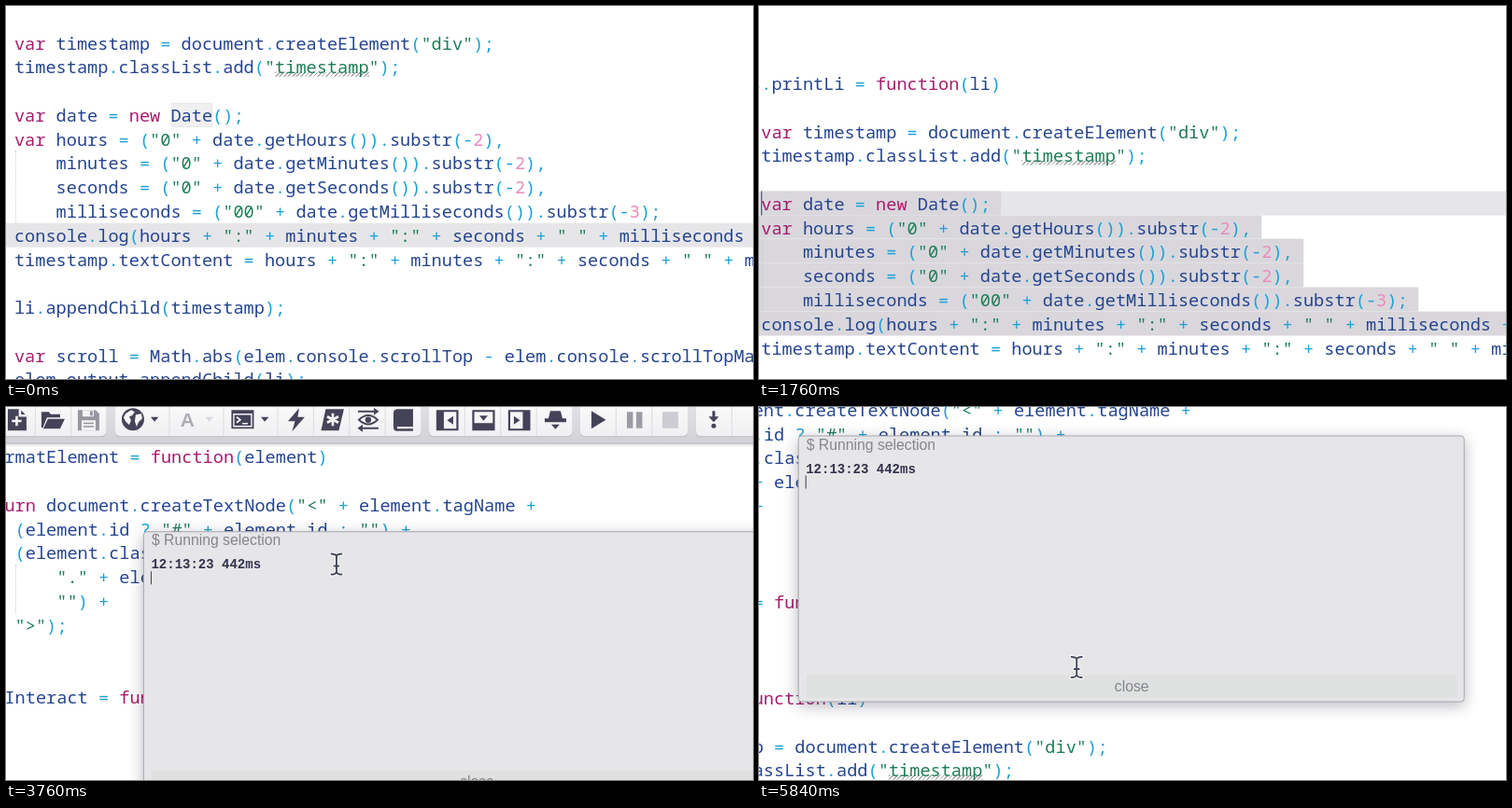
Animation, 800 px wide and 400 px high, one loop 6240 ms. Source, as an HTML page:

```html
<!DOCTYPE html>
<html lang="en">
<head>
<meta charset="utf-8">
<title>Running a selection</title>
<style>
html, body { margin: 0; width: 100%; height: 100%; overflow: hidden; background: #fff; }
#stage { position: relative; width: 800px; height: 400px; overflow: hidden; background: #fff; }
#cam { position: absolute; left: 0; top: 0; width: 0; height: 0; }
#cam > * , #popup > * , .row, .bar, .guide { position: absolute; }
.row { font: 18.62px/25.77px "Noto Sans Mono", "DejaVu Sans Mono", monospace; white-space: pre; color: #25458f; }
.k { color: #a81c6b; }
.s { color: #1f7d57; }
.n { color: #ea8cbd; }
.o { color: #1ba0d6; }
.bar { height: 25.77px; }
.sel { background: #d9d7dc; }
#active { left: -300px; width: 1500px; background: #e6e6e8; }
#word { background: #f0f0f1; box-shadow: inset 0 0 0 1px #e6e7ea; }
#caret { width: 1.4px; background: #33344a; }
.guide { width: 0; border-left: 1px dotted #c9cbd2; }
#wave { height: 5px; background: repeating-linear-gradient(-45deg, #a9aaae 0 1.2px, transparent 1.2px 3.2px); }
#bar { left: -60px; top: 0; }
#popup { left: 160px; top: 146px; width: 712px; height: 284px; background: #e6e6e8; border: 1px solid #a7a7b0;
  border-radius: 4px; box-shadow: 0 4px 16px rgba(40, 40, 60, .32); font: 15.75px/20px "Liberation Sans", Arial, sans-serif; color: #85858e; }
#head { left: 8px; top: -1px; white-space: pre; }
#out { left: 7.5px; top: 25px; font: bold 14px/20px "Liberation Mono", "Courier New", monospace; color: #33324c; }
#prompt { left: 7px; top: 42px; width: 1.4px; height: 14px; background: #3c3c52; }
#close { left: 8px; top: 256px; width: 697px; height: 24px; line-height: 23px; text-align: center; background: #dfe0e0; }
#mouse { left: 0; top: 0; width: 1px; height: 1px; overflow: visible; }
</style>
</head>
<body>
<div id="stage"><div id="cam">
  <div id="active" class="bar"></div>
  <div id="word" class="bar"></div>
  <div id="code"></div>
  <div id="caret" class="bar"></div>

  <svg id="bar" width="1100" height="58" viewBox="-60 0 1100 58">
    <defs>
      <linearGradient id="metal" x2="0" y2="1"><stop stop-color="#e6e5e9"/><stop offset="1" stop-color="#d2d1d6"/></linearGradient>
      <linearGradient id="key" x2="0" y2="1"><stop stop-color="#fafafb"/><stop offset="1" stop-color="#f0f0f2"/></linearGradient>
      <linearGradient id="fade" x2="0" y2="1"><stop stop-color="#000" stop-opacity=".14"/><stop offset="1" stop-opacity="0"/></linearGradient>
    </defs>
    <path d="M-60 0H1040V52H-60z" fill="url(#metal)"/>
    <path d="M-60 51.5H1040" stroke="#bdbcc2"/>
    <path d="M-60 52H1040V56H-60z" fill="url(#fade)"/>
    <g id="keys" fill="url(#key)"></g>
    <g fill="#454358" stroke="none">
      <path d="M15 15H28L35 22V38H15z"/>
      <path d="M28 15V22H35M24.5 22.500V33M19.300 27.700H29.700" stroke="#f5f5f7" stroke-width="2.600" fill="none"/>
      <path d="M51 35V18H59L61 20.500H71V24H57L52.500 35z"/>
      <path d="M58 25.500H76L71 36H53z"/>
      <g fill="#9796a1">
        <path d="M90 16H109L113 20V38H90z"/>
        <path d="M95 16H107V23H95zM94 27H109V38H94z" fill="#f3f3f5"/>
        <path d="M103 17H106V22H103zM96 29.500H107V31H96zM96 33H107V34.500H96z"/>
      </g>
      <circle cx="149" cy="26" r="12"/>
      <path d="M141 20L147 16L151 18L148 22L145 23L147 27L145 32L141 28L139 24zM152 21L158 20L159 25L155 29L153 34L151 28z" fill="#f5f5f7"/>
      <path id="drop" d="M168 23.500H176.500L172.200 28.500z"/>
      <text x="207.500" y="34" text-anchor="middle" font-family="Liberation Sans, Arial, sans-serif" font-weight="bold" font-size="21" fill="#adacb6">A</text>
      <path d="M168 23.500H176.500L172.200 28.500z" transform="translate(58.500 0)" fill="#d9d9de"/>
      <path d="M254.500 16H278.500V36H254.500z"/>
      <path d="M257 20.500H276V33.500H257z" fill="none" stroke="#f5f5f7" stroke-width="1.400"/>
      <path d="M260 23.500L264 26.500L260 29.500M266 30.500H272" fill="none" stroke="#f5f5f7" stroke-width="1.600"/>
      <use href="#drop" x="118"/>
      <path d="M327 14L315 28H322.500L319.500 39L333 23.500H325.500z"/>
      <path d="M355.500 15H375L369.500 38H350.500z"/>
      <path d="M363 19.500V33M357 23L369 29.500M369 23L357 29.500" stroke="#f5f5f7" stroke-width="2.600"/>
      <g fill="none" stroke="#454358" stroke-width="2.200">
        <path d="M390 17.500H408M394 35.500H412"/>
        <path d="M391 26.500Q401 17 411 26.500Q401 36 391 26.500z" stroke-width="1.800"/>
      </g>
      <path d="M407 13.500L412.500 17.500L407 21.500zM395 31.500L389.500 35.500L395 39.500z"/>
      <circle cx="401" cy="26.500" r="3.200"/>
      <path d="M432 15H449V34H432V36H449V38.500H431Q428 38 428 34V19Q428 15.500 432 15z"/>
      <path d="M432 35H448" stroke="#f5f5f7" stroke-width="1.600"/>
      <g id="pane"><path d="M475 17H496.500V37H475z" fill="none" stroke="#454358" stroke-width="2.200"/><path d="M475 17H482V37H475z"/></g>
      <path d="M492 22.500V31.500L485.500 27z"/>
      <path d="M513.500 17H535.500V37H513.500z" fill="none" stroke="#454358" stroke-width="2.200"/>
      <path d="M513.500 30H535.500V37H513.500zM520 22H529L524.500 27.500z"/>
      <use href="#pane" transform="translate(1048.500 0) scale(-1 1)"/>
      <path d="M557 22.500V31.500L563.500 27z"/>
      <path d="M594 25L596 17H607L609 25H613V29H590V25zM597 31.500H606L601.500 36.500z"/>
      <path d="M640 17L655.500 26.500L640 36z"/>
      <path d="M678 18H684.500V35.500H678zM688 18H694.500V35.500H688z" fill="#9d9ca6"/>
      <path d="M716 18H733V35.500H716z" fill="#cdccd3"/>
      <path d="M769.500 17H772.500V23H776.500L771 29L765.500 23H769.500z"/>
      <circle cx="771" cy="33" r="2.500"/>
    </g>
  </svg>

  <div id="popup">
    <div id="head">$ Running selection</div>
    <div id="out">12:13:23 442ms</div>
    <div id="prompt"></div>
    <div id="close">close</div>
  </div>

  <svg id="mouse">
    <g id="beam" fill="none" stroke-linecap="round">
      <path id="stem" d="M-5.500 -11Q-1 -11 0 -8.500Q1 -11 5.500 -11M0 -8.500V8.500M-5.500 11Q-1 11 0 8.500Q1 11 5.500 11M-2.500 2H2.500" stroke="#fff" stroke-width="4"/>
      <use href="#stem" style="display:none"/>
      <path d="M-5.500 -11Q-1 -11 0 -8.500Q1 -11 5.500 -11M0 -8.500V8.500M-5.500 11Q-1 11 0 8.500Q1 11 5.500 11M-2.500 2H2.500" stroke="#464a60" stroke-width="2"/>
    </g>
    <path id="arrow" d="M0 0V20L4.700 16L8.500 24.500L12.300 23L8.500 14.700H14.500z" fill="#38374c" stroke="#fff" stroke-width="1.300"/>
  </svg>
</div></div>

<script>
const LOOP = 6240, STEP = 80;
const CW = 18.62 * 0.6, LH = 25.77, LEFT = -22, TOP = 53.3;
const $ = id => document.getElementById(id);
const colX = c => LEFT + c * CW;
const rowY = r => TOP + r * LH;

// row, column, text
const lines = [
  [0, -4, 'this.formatElement = function(element)'],
  [2, 0, 'return document.createTextNode("<" + element.tagName +'],
  [3, 4, '(element.id ? "#" + element.id : "") +'],
  [4, 4, '(element.className && element.className.split ?'],
  [5, 8, '"." + element.className.split(" ").join(" .") :'],
  [6, 8, '"") +'],
  [7, 4, '">");'],
  [10, -4, 'this.onInteract = function()'],
  [14, -4, 'this.printLi = function(li)'],
  [16, 0, 'var timestamp = document.createElement("div");'],
  [17, 0, 'timestamp.classList.add("timestamp");'],
  [19, 0, 'var date = new Date();'],
  [20, 0, 'var hours = ("0" + date.getHours()).substr(-2),'],
  [21, 4, 'minutes = ("0" + date.getMinutes()).substr(-2),'],
  [22, 4, 'seconds = ("0" + date.getSeconds()).substr(-2),'],
  [23, 4, 'milliseconds = ("00" + date.getMilliseconds()).substr(-3);'],
  [24, 0, 'console.log(hours + ":" + minutes + ":" + seconds + " " + milliseconds + "ms");'],
  [25, 0, 'timestamp.textContent = hours + ":" + minutes + ":" + seconds + " " + milliseconds + "ms";'],
  [27, 0, 'li.appendChild(timestamp);'],
  [29, 0, 'var scroll = Math.abs(elem.console.scrollTop - elem.console.scrollTopMax);'],
  [30, 0, 'elem.output.appendChild(li);']
];

const token = /("[^"]*")|\b(var|new|function|return|this)\b|(\d+)|([^\w\s"]+)|\w+|\s+/g;
const esc = s => s.replace(/&/g, '&amp;').replace(/</g, '&lt;');
const paint = text => text.replace(token, (all, s, k, n, o) => {
  const kind = s ? 's' : k ? 'k' : n ? 'n' : o ? 'o' : '';
  return kind ? `<span class="${kind}">${esc(all)}</span>` : all;
});

function add(cls, x, y, w, h) {
  const el = document.createElement('div');
  el.className = cls;
  place(el, x, y, w, h);
  $('code').append(el);
  return el;
}
function place(el, x, y, w, h) {
  el.style.left = x + 'px';
  el.style.top = y + 'px';
  if (w !== undefined) el.style.width = w + 'px';
  if (h !== undefined) el.style.height = h + 'px';
}
const show = (el, on) => { el.style.visibility = on ? 'visible' : 'hidden'; };

const FIRST = 19, LAST = 24, ends = {}, bars = {};
for (const [r, c, text] of lines) ends[r] = c + text.length;
for (let r = FIRST; r <= LAST; r++) bars[r] = add('bar sel', 0, rowY(r), 0);
add('guide', colX(0) + 1, rowY(21), 0, LH * 3);
add('guide', colX(4), rowY(5), 0, LH * 2);
add('bar', colX(25), rowY(17) + 18.5, CW * 9).id = 'wave';
for (const [r, c, text] of lines) add('row', colX(c), rowY(r)).innerHTML = paint(text);
place($('word'), colX(15), rowY(FIRST), CW * 4);

// toolbar groups: left edge, button widths
const B = 38.4;
const groups = [[6, B, B, B - 1], [130, 58, 58, 58, B, B, B, B], [466, B, B, B, B], [628, B, B, B], [752, B, B, B, B]];
$('keys').innerHTML = groups.map(([x, ...ws]) => {
  const total = ws.reduce((a, b) => a + b);
  let at = x;
  const seams = ws.slice(0, -1).map(w => `M${at += w} 10V44`).join('');
  return `<rect x="${x}" y="10" width="${total}" height="35" rx="5" fill="#b9b8bf"/>` +
    `<rect x="${x}" y="9" width="${total}" height="35" rx="5"/><path d="${seams}" stroke="#dcdbe0"/>`;
}).join('');

const part = (t, a, b) => Math.min(1, Math.max(0, (t - a) / (b - a)));
const sine = p => (1 - Math.cos(Math.PI * p)) / 2;
const cubic = p => p < 0.5 ? 4 * p ** 3 : 1 - 4 * (1 - p) ** 3;
const mix = (a, b, p) => a.map((v, i) => v + (b[i] - v) * p);

function camera(t) {
  if (t < 3440) return mix([30.9, -439.3], [0, 0], cubic(part(t, 1517, 2160)));
  return mix([0, 0], [-118.3, -115.5], sine(part(t, 3672, 4080)));
}

function pointer(t) {
  if (t < 3440) return mix([336, 346], [322, 16], sine(part(t, 2160, 2880)));
  if (t < 4560) return mix([322, 16], [409.5, 337.5], sine(part(t, 3480, 4030)));
  return [458.5, 394.5];
}

function select(t) {
  const ups = t < 320 ? 0 : Math.min(5, 1 + Math.floor((t - 320) / 200));
  const home = t >= 1440, row = LAST - ups;
  const caretX = colX(home ? 0 : ends[row]);
  for (let r = FIRST; r <= LAST; r++) {
    const x = r > row ? -300 : caretX;
    const on = ups && r >= row;
    place(bars[r], x, rowY(r), on ? colX(ends[r] + 1) - x : 0);
  }
  $('active').style.top = rowY(row) + 'px';
  place($('caret'), caretX, rowY(row));
  show($('caret'), ups);
  show($('word'), !ups);
}

function draw(time) {
  const t = Math.floor((time % LOOP) / STEP) * STEP;
  const [cx, cy] = camera(t), [mx, my] = pointer(t);
  $('cam').style.transform = `translate(${cx}px, ${cy}px)`;
  select(t);
  show($('popup'), t >= 3120);
  show($('out'), t >= 3600);
  show($('prompt'), t >= 3600);
  $('mouse').style.transform = `translate(${mx}px, ${my}px)`;
  show($('beam'), t >= 2160 && my > 52);
  show($('arrow'), t >= 2160 && my <= 52);
}

const start = performance.now();
function tick() {
  draw(performance.now() - start);
  requestAnimationFrame(tick);
}
tick();
</script>
</body>
</html>
```
